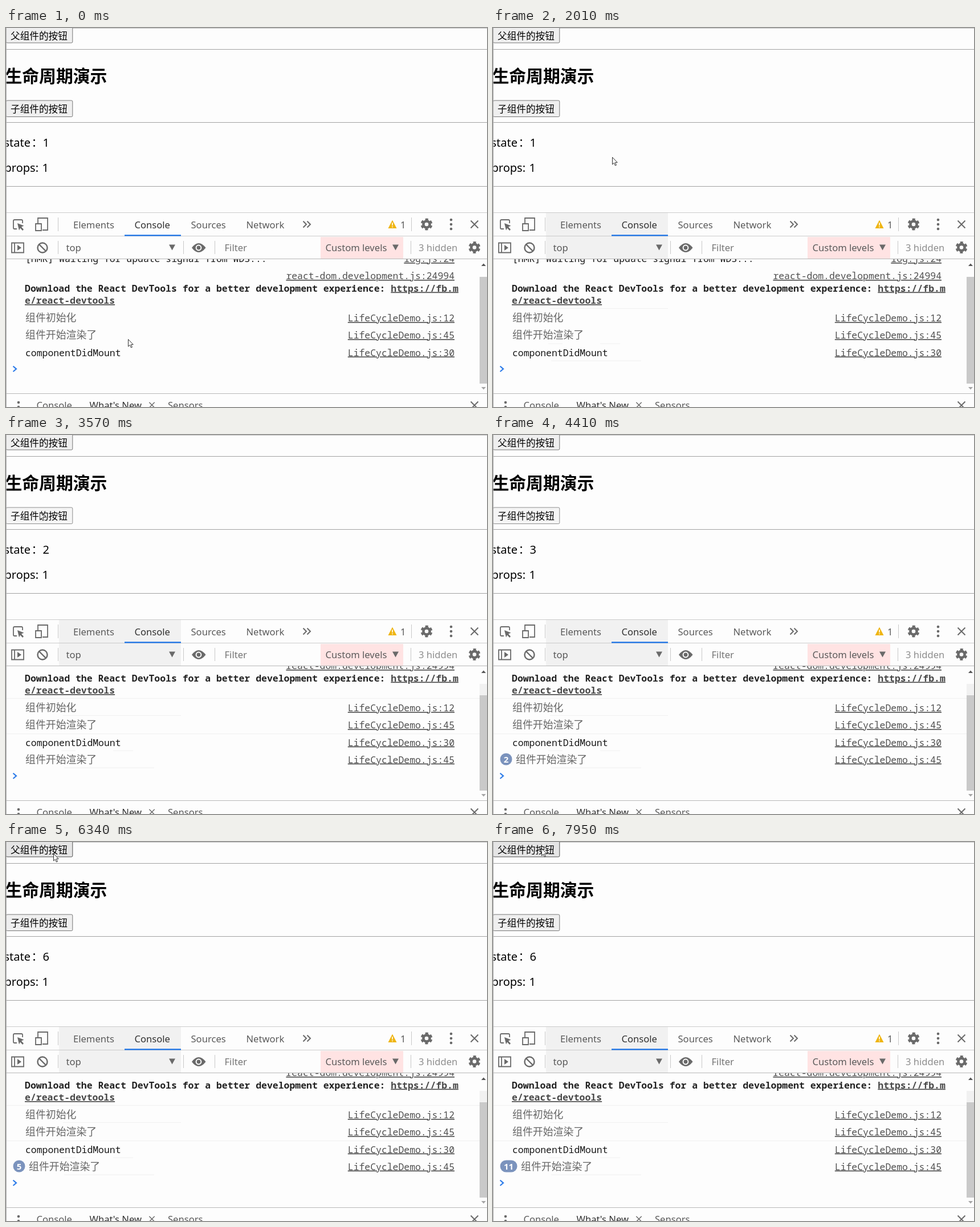
Recreate the animation shown at these times as an HTML page. Size 844 by 664 pixels, loop 8 s.

```html
<!DOCTYPE html>
<html lang="zh">
<head>
<meta charset="utf-8">
<title>生命周期演示</title>
<style>
html, body { margin: 0; width: 100%; height: 100%; overflow: hidden; background: #fdfdfd; }
svg { display: block; }
text { white-space: pre; font: 16.6px "Noto Sans", "Open Sans", "Noto Sans CJK SC", "Noto Sans CJK", sans-serif; fill: #5a5a5a; }
text.cjk { font: 16.67px "Noto Sans CJK SC", "Noto Sans CJK", sans-serif; fill: #000; }
text.title { font-size: 29.8px; font-weight: 700; }
text.value { font-size: 20px; fill: #000; }
text.code { font: 16.43px "Noto Sans Mono", "Liberation Mono", monospace; fill: #181818; }
text.log { font: 300 17.9px "Noto Sans CJK SC", "Noto Sans CJK", sans-serif; fill: #666; }
text.link { text-anchor: end; fill: #505050; }
.link, .url { text-decoration: underline; }
text.bold { font-size: 16.48px; font-weight: 700; fill: #222; }
text.url, .url { fill: #484848 !important; }
.dark { fill: #303030 !important; }
.icon { fill: none; stroke: #6a6a6a; stroke-width: 2; }
.solid { fill: #6a6a6a; }
.sep { stroke: #c8c8c8; }
.faint { stroke: #f0f0f0; }
</style>
</head>
<body>
<svg width="844" height="664" viewBox="0 0 844 664">
  <defs>
    <clipPath id="pane"><rect y="405" width="831" height="235"/></clipPath>
    <g id="gear" class="icon">
      <circle r="5.6" stroke-width="4.6"/>
      <circle r="8.7" stroke-width="3.4" stroke-dasharray="5 4.11" stroke-dashoffset="-2.05"/>
    </g>
    <path id="cross" class="icon" d="M-6.5-6.5 6.5 6.5M6.5-6.5-6.5 6.5"/>
    <g id="dots" class="solid"><circle cy="-8" r="2.3"/><circle r="2.3"/><circle cy="8" r="2.3"/></g>
  </defs>

  <!-- page -->
  <path d="M0 37.5H844M0 165.5H844M0 277.5H844" stroke="#a2a2a2"/>
  <path d="M0 .5H844" stroke="#c4c4c4"/>
  <rect id="parent" x=".5" y="-3.5" width="116.3" height="29.5" rx="2"/>
  <rect id="child" x=".5" y="127" width="116.3" height="28.5" rx="2"/>
  <text class="cjk" x="8" y="19.6">父组件的按钮</text>
  <text class="cjk" x="8" y="148">子组件的按钮</text>
  <text class="cjk title" x="-1.5" y="95">生命周期演示</text>
  <text class="value" x="-3.5" y="207.5">state</text>
  <text class="cjk" style="font-size:20px" x="44.5" y="207.5">：</text>
  <text class="value" id="state" x="64.5" y="207.5">1</text>
  <text class="value" x="-2.5" y="252">props:</text>
  <text class="value" x="63.5" y="252">1</text>

  <!-- tool bars -->
  <path id="hover" d="M93 324H307V404H93Z" fill="#f1f1f1"/>
  <path d="M0 323.5H844M0 364.5H844" stroke="#cbcbcb"/>
  <path d="M0 404.5H844M0 640.5H844" stroke="#b8b8b8"/>
  <path d="M208 363.3H307" stroke="#1a73e8" stroke-width="2.2"/>
  <path class="sep" d="M91.5 332V356M711.5 332V356M91.5 373V396M311.5 373V396M366.5 373V396M710.5 373V396"/>
  <g class="icon">
    <path d="M19 352H15Q13 352 13 350V338Q13 336 15 336H27Q29 336 29 338V342" stroke-width="1.8"/>
    <path d="M56 342V333H73V354H64M52 343H62V355H52Z" stroke-width="1.8"/>
    <path d="M521.5 338.5 527 344 521.5 349.5M528.5 338.5 534 344 528.5 349.5"/>
    <path d="M10 376.5H31V393.5H10ZM15 376V394" stroke-width="1.8"/>
    <circle cx="64" cy="385" r="8.5" stroke-width="2.4"/>
    <path d="M58 379 70 391" stroke-width="2.4"/>
  </g>
  <path class="solid" d="M20 342 31.5 346.5 27 348.5 31 353 29 355 25 350.5 23 354.5ZM20 380 27 385 20 390Z"/>
  <path class="solid" d="M326 385Q338 369 350.5 385Q338 401 326 385Z"/>
  <circle cx="338" cy="385" r="4.4" fill="none" stroke="#fdfdfd" stroke-width="2"/>
  <rect x="552" y="366" width="145" height="38" fill="#ffe3e3"/>
  <path class="solid" d="M286 379.5H297L291.5 389.5ZM678 379.5H689L683.5 389.5Z"/>
  <path d="M678 336.5 685.5 351H670.5Z" fill="#efb513"/>
  <path d="M678 341V346M678 347.5V349.3" stroke="#fff" stroke-width="1.6"/>
  <use href="#gear" x="738" y="344"/><use href="#gear" x="822" y="384.5"/>
  <use href="#dots" x="781" y="344"/><use href="#cross" x="822" y="344"/>
  <text x="118" y="351">Elements</text>
  <text x="225.5" y="351" class="dark">Console</text>
  <text x="324.5" y="351">Sources</text>
  <text x="421.5" y="351">Network</text>
  <text x="692" y="351">1</text>
  <text x="105.5" y="391">top</text>
  <text x="383.5" y="391" style="fill:#757575">Filter</text>
  <text x="560.5" y="391">Custom levels</text>
  <text x="724" y="391" style="fill:#8d8d8d">3 hidden</text>

  <!-- console -->
  <g clip-path="url(#pane)">
    <path class="faint" id="line1" d="M97 553H122M188 553H223"/>
    <path class="faint" id="line2" d="M102 583H260M100 491.5H307"/>
    <path class="faint" id="line3" d="M0 461.5H831M0 523.5H831"/>
    <g id="rows">
      <text class="code" x="34" y="410">[HMR] Waiting for update signal from WDS...</text>
      <text class="code link" x="787" y="410">log.js:24</text>
      <text class="code link" x="787" y="440">react-dom.development.js:24994</text>
      <text class="code bold" x="33" y="461.5">Download the React DevTools for a better development experience: <tspan class="url">https://fb.m</tspan></text>
      <text class="code bold url" x="33" y="483">e/react-devtools</text>
      <text class="log" x="34" y="514">组件初始化</text>
      <text class="code link" x="787" y="514">LifeCycleDemo.js:12</text>
      <text class="log" x="34" y="544">组件开始渲染了</text>
      <text class="code link" x="787" y="544">LifeCycleDemo.js:45</text>
      <text class="code" x="34" y="574.5">componentDidMount</text>
      <text class="code link" x="787" y="574.5">LifeCycleDemo.js:30</text>
    </g>
    <g id="last">
      <g id="badge">
        <rect id="pill" x="12.5" y="557.5" width="21" height="21" rx="10.5" fill="#7b93bd"/>
        <text id="count" y="573.5" text-anchor="middle" style="font-size:15px;font-weight:700;fill:#fff"></text>
      </g>
      <text class="log" id="render" y="574.5">组件开始渲染了</text>
      <text class="code link" x="787" y="574.5">LifeCycleDemo.js:45</text>
    </g>
    <path d="M12.5 592.5 18 597.3 12.5 602" fill="none" stroke="#2f7de9" stroke-width="2.2"/>
  </g>
  <path d="M834 417 838 412.5 842 417Z" fill="#555"/>
  <path d="M834 629 838 633.5 842 629Z" fill="#a5a5a5"/>
  <rect x="831" y="436" width="13" height="187" fill="#f1f1f1"/>
  <rect id="thumb" x="831" width="13" fill="#c9c9c9"/>

  <!-- drawer -->
  <use href="#dots" x="22" y="664"/>
  <text x="53.5" y="667">Console</text>
  <text x="146.5" y="667" class="dark">What's New</text>
  <text x="284" y="667">Sensors</text>
  <use href="#cross" transform="translate(256 660.5) scale(.72)"/>
  <use href="#cross" x="822" y="661"/>

  <path d="M.5 0V664" stroke="#b2b2b2"/>
  <path id="cursor" d="M.5.5V13L3.4 10.3 5.4 15 7.4 14.2 5.4 9.6H9.2Z" fill="#fff" stroke="#333"/>
</svg>
<script>
const $ = id => document.getElementById(id);
const LOOP = 8000;

// Each track lists [start time, value...]; a value holds until the next entry.
const pointer = [
  [0, 214, 545], [430, 205, 545], [590, 188, 547], [730, 140, 539], [850, 98, 531],
  [1000, 97, 547], [1150, 106, 567], [1310, 104, 579], [1450, 102, 579],
  [1730, 180, 500], [1860, 235, 429], [2010, 209, 226], [2160, 150, 180],
  [2280, 84, 146], [2400, 59, 135], [6190, 80, 57], [6340, 83, 20], [6470, 84, 13], [6610, 85, 11]
];
const childMode = [
  [0, 'idle'], [2280, 'over'], [2670, 'down'], [2820, 'over'], [3570, 'down'], [3700, 'over'],
  [4410, 'down'], [4560, 'over'], [5510, 'down'], [5630, 'over'], [6190, 'idle']
];
const parentMode = [
  [0, 'idle'], [6340, 'over'], [7020, 'down'], [7170, 'over'], [7440, 'down'],
  [7590, 'over'], [7710, 'down'], [7830, 'over']
];
const clicks = [[0, 1], [2820, 2], [3700, 3], [4560, 4], [4960, 5], [5630, 6]];
const renders = [
  [0, 0], [2820, 1], [3700, 2], [4560, 3], [4960, 4], [5630, 5], [7170, 7], [7590, 9], [7830, 11]
];
const looks = {
  idle: ['#efefef', '#767676'],
  over: ['#e5e5e5', '#4f4f4f'],
  down: ['#f5f5f5', '#8d8d8d']
};

const at = (track, t) => track.findLast(step => step[0] <= t).slice(1);
const set = (id, attrs) => {
  for (const name in attrs) $(id).setAttribute(name, attrs[name]);
};
const show = (id, on) => set(id, { visibility: on ? 'visible' : 'hidden' });

function paint(id, track, t) {
  const [fill, stroke] = looks[at(track, t)[0]];
  set(id, { fill, stroke });
}

function draw(t) {
  const [x, y] = at(pointer, t);
  const [n] = at(renders, t);
  const wide = n > 9;
  const logged = n > 0;

  set('cursor', { transform: `translate(${x} ${y})` });
  paint('child', childMode, t);
  paint('parent', parentMode, t);
  $('state').textContent = at(clicks, t)[0];

  show('hover', t >= 1860);
  show('line1', t >= 850);
  show('line2', t >= 1730);
  show('line3', logged);

  set('rows', { transform: `translate(0 ${logged ? -30 : 0})` });
  set('thumb', { y: logged ? 456 : 436, height: logged ? 167 : 187 });
  set('last', { display: logged ? 'inline' : 'none' });
  set('badge', { display: n > 1 ? 'inline' : 'none' });
  set('pill', { width: wide ? 30 : 21 });
  set('count', { x: wide ? 27.5 : 23 });
  set('render', { x: wide ? 49 : n > 1 ? 40 : 34 });
  $('count').textContent = n;
}

const start = performance.now();
function tick() {
  draw((performance.now() - start) % LOOP);
  requestAnimationFrame(tick);
}
tick();
</script>
</body>
</html>
```
